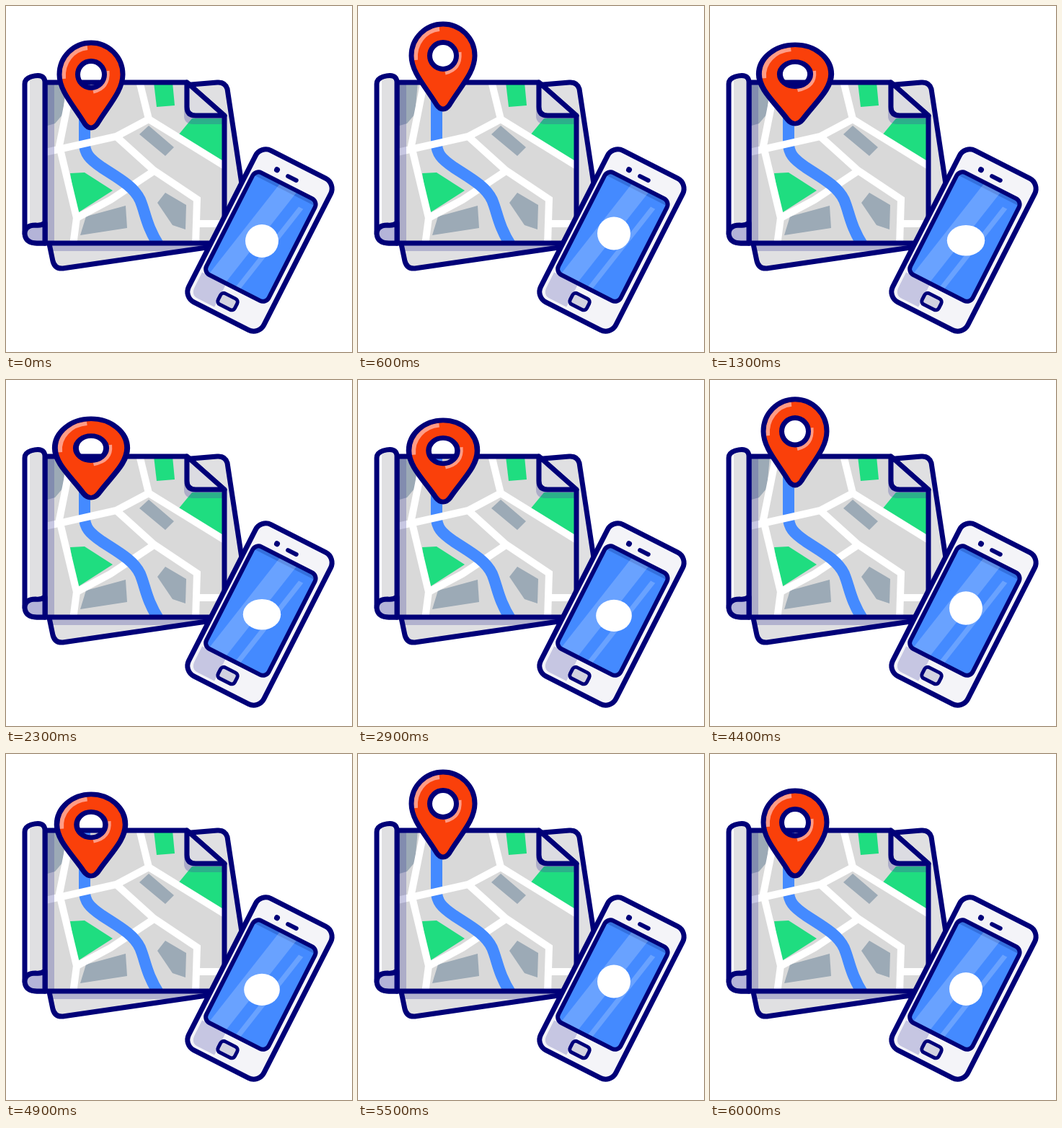
Recreate the animation shown at these times as an HTML page with a canvas. Size 480x480 px, loop 6.1 s.

```html
<!DOCTYPE html>
<html lang="en">
<head>
<meta charset="utf-8">
<title>Map and phone</title>
<style>
html, body { margin: 0; width: 100%; height: 100%; overflow: hidden; background: #fff; }
canvas { display: block; }
</style>
</head>
<body>
<canvas id="stage" width="480" height="480"></canvas>
<script>
const ctx = document.getElementById('stage').getContext('2d');
const LOOP = 6100, STEP = 100, BOUNCE = 1000;
const NAVY = '#000078', GREY = '#d9d9d9', LAVENDER = '#b4b4d8', PALE = '#e0e0e2';
const BLUE = '#448aff', GREEN = '#1fdd80', SLATE = '#9caab6', RED = '#fa400a';
const SHADE = 'rgba(70, 70, 160, 0.3)', SHINE = 'rgba(255, 255, 255, 0.2)';

// time, lift, horizontal scale, vertical scale
const BOUNCE_KEYS = [
  [0, 0, 1, 1], [0.2, 0, 1.18, 0.87], [0.3, 6, 1.14, 0.927], [0.4, 23, 1, 1.01],
  [0.5, 26, 1, 1], [0.6, 26, 1, 1], [0.7, 20, 1, 1], [0.8, 0, 1.12, 0.93],
  [0.9, 0, 1.08, 0.96], [1, 0, 1, 1]
];

function bouncePose(phase) {
  const i = BOUNCE_KEYS.findIndex(key => key[0] > phase);
  const a = BOUNCE_KEYS[i - 1], b = BOUNCE_KEYS[i];
  const k = (phase - a[0]) / (b[0] - a[0]);
  const [, lift, sx, sy] = a.map((v, n) => v + (b[n] - v) * k);
  return { lift, sx, sy };
}

function paint(path, fill, stroke, width = 7) {
  const shape = path instanceof Path2D ? path : new Path2D(path);
  if (fill) { ctx.fillStyle = fill; ctx.fill(shape, 'evenodd'); }
  if (stroke) { ctx.strokeStyle = stroke; ctx.lineWidth = width; ctx.stroke(shape); }
}

function roundBox(cx, cy, w, h, r) {
  const path = new Path2D();
  path.roundRect(cx - w / 2, cy - h / 2, w, h, r);
  return path;
}

function isolated(draw) {
  ctx.save();
  draw();
  ctx.restore();
}

function drawRoads(roads) {
  roads.forEach(road => paint(road, null, '#fff', 10));
}

function drawBackSheet() {
  const sheet = 'M60 330L65 354Q68 365 79 364L285 334L329 260L307 115Q304 105 293 106L245 110Z';
  paint(sheet, PALE);
  isolated(() => {
    ctx.clip(new Path2D(sheet));
    paint('M54 330H303V340H54Z', SHADE);
  });
  paint(sheet, null, NAVY);
}

function drawMap() {
  const sheet = 'M54 106H251L303 152V329H54Z';
  drawBackSheet();
  paint(sheet, GREY);
  isolated(() => {
    ctx.clip(new Path2D(sheet));
    paint('M54 106H83L79 150L68 163L54 167Z', SLATE);
    paint('M198 166L233 196L221 208L185 178Z', SLATE);
    paint('M111 292L166 277L168 308L103 318Z', SLATE);
    paint('M221 259L250 276L249 310L231 304L210 273Z', SLATE);
    paint('M205 106H231L234 138L209 140Z', GREEN);
    paint('M89 232L109 231L148 256L98 288Z', GREEN);
    paint('M239 179L258 156H304V217Z', GREEN);
    ctx.lineJoin = 'miter';
    drawRoads(['M92 104L74 194L98 294L93 332', 'M98 294L145 269L205 229']);
    paint('M109 104V188C108 205 117 213 133 224C156 239 177 250 186 269C194 288 194 304 213 334', null, BLUE, 16);
    drawRoads([
      'M54 203L153 181L198 157L305 223', 'M185 104L198 157',
      'M153 181L205 228L265 268L263 332', 'M263 302H304'
    ]);
    paint('M54 106H67V330H54Z', SHADE);
    paint('M247 106V152Q247 164 260 164H303V106Z', SHADE);
  });
  paint(sheet, null, NAVY);
  paint('M251 106L303 152H263Q251 152 251 140Z', '#dcdce2', NAVY);
  drawRoll();
}

function drawRoll() {
  const roll = 'M26 108Q26 101 35 98Q53 93 54 105V329H43Q26 328 26 313Z';
  paint(roll, PALE);
  isolated(() => {
    ctx.clip(new Path2D(roll));
    paint('M31 104V306', null, '#fff', 4);
  });
  paint(roll, null, NAVY);
  paint('M54 301Q49 305 41 304Q26 304 26 316Q27 329 43 329H54Z', LAVENDER, NAVY);
}

function drawPhone() {
  const body = roundBox(0, 0, 117, 236, 16);
  const screen = roundBox(-1, -5, 97, 159, 9);
  isolated(() => {
    ctx.translate(352, 325);
    ctx.rotate(27 * Math.PI / 180);
    paint(body, '#f4f4f8');
    paint('M-51 76H-14V111H-40Q-51 111 -51 98Z', '#c6c6e2');
    paint(body, null, NAVY);
    paint(screen, BLUE);
    isolated(() => {
      ctx.clip(screen);
      paint('M-50 -80H50', null, '#3470dd', 6);
      paint('M-42 76L-10 -86H16L-16 76Z', SHINE);
      paint('M-1 76L27 -66H34L6 76Z', SHINE);
    });
    paint(screen, null, NAVY, 6);
    paint(roundBox(-23, -98, 8, 8, 4), NAVY);
    paint(roundBox(1, -97, 19, 6, 3), NAVY);
    paint(roundBox(-1, 96, 26, 17, 5), '#d2d2e0', NAVY, 5);
  });
}

function drawBouncing(x, y, pose, liftScale, draw) {
  isolated(() => {
    ctx.translate(x, y - pose.lift * liftScale);
    ctx.scale(pose.sx, pose.sy);
    draw();
  });
}

function drawPin() {
  const pin = 'M0 -3Q-5 -3 -9 -9C-24 -34 -44 -54 -44 -77A44 44 0 0 1 44 -77C44 -54 24 -34 9 -9Q5 -3 0 -3Z' +
    'M18.5 -77A18.5 18.5 0 1 0 -18.5 -77A18.5 18.5 0 1 0 18.5 -77Z';
  paint(pin, RED);
  paint('M-38 -71C-40 -94 -25 -112 -5 -114', null, '#ff9c86', 6);
  paint('M23 -82Q25 -58 3 -53', null, '#ff9c86', 5);
  paint(pin, null, NAVY);
}

function drawBadge() {
  paint(roundBox(0, -23, 46, 46, 23), '#fff');
}

function frame(now) {
  const time = Math.floor((now % LOOP) / STEP) * STEP;
  const pose = bouncePose((time % BOUNCE) / BOUNCE);
  ctx.clearRect(0, 0, 480, 480);
  ctx.lineJoin = 'round';
  drawMap();
  drawPhone();
  drawBouncing(355, 349, pose, 0.4, drawBadge);
  drawBouncing(118, 172, pose, 1, drawPin);
  requestAnimationFrame(frame);
}
requestAnimationFrame(frame);
</script>
</body>
</html>
```
